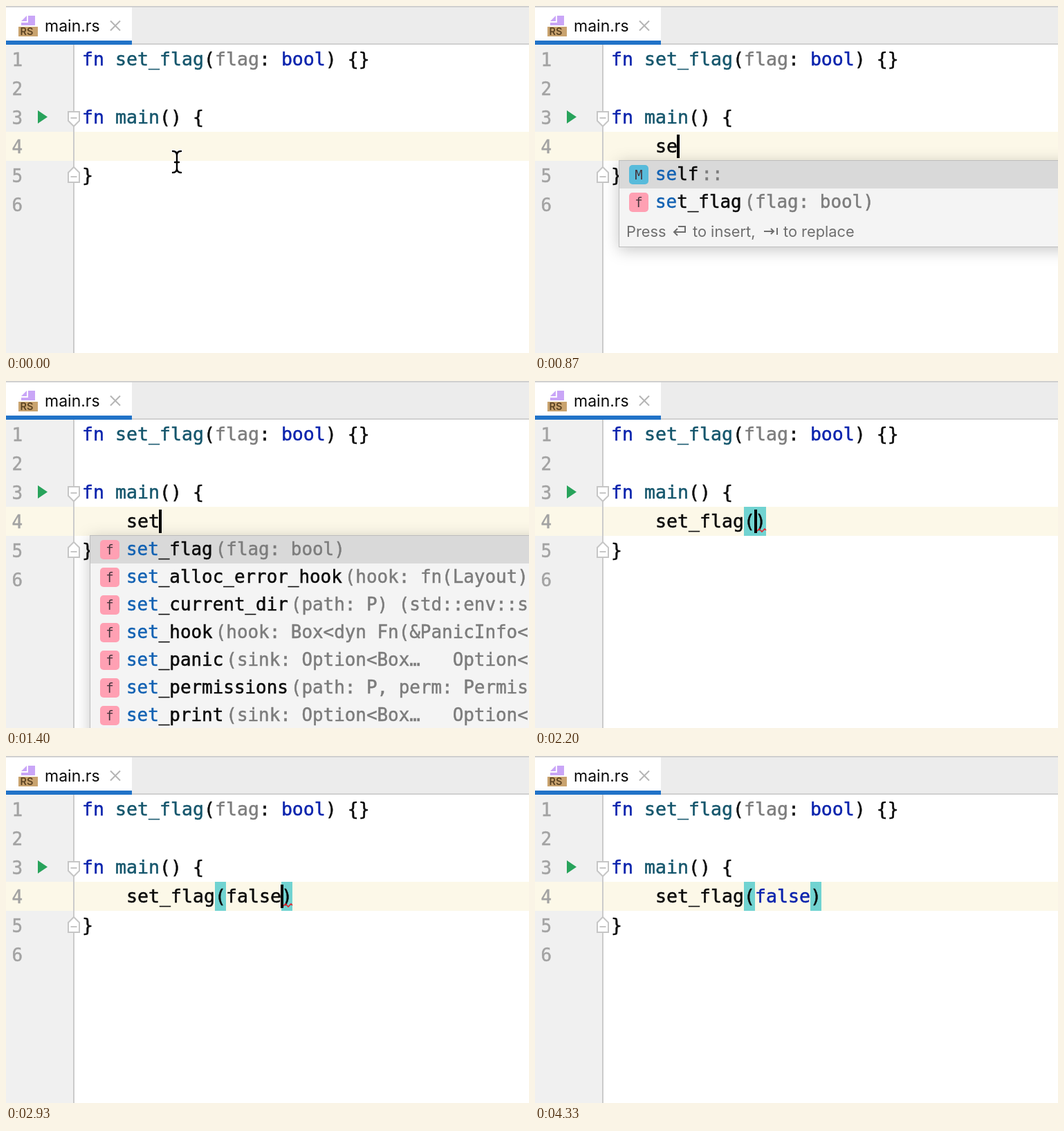
These frames come from a looping animation (756 by 502 pixels, 4390 ms). An HTML page:

```html
<!DOCTYPE html>
<html lang="en">
<head>
<meta charset="utf-8">
<title>Code completion</title>
<style>
  html, body { margin: 0; width: 100%; height: 100%; overflow: hidden; background: #fff; }
  svg { display: block; }
  text { white-space: pre; color: #0a0a0a; }
  text, tspan { fill: currentColor; }
  .code { font: 26.57px "DejaVu Sans Mono", monospace; }
  .item, .num { font: 25.9px "DejaVu Sans Mono", monospace; }
  .code, .item, .num, .code tspan, .item tspan { stroke: currentColor; stroke-width: .5px; }
  .item.bold, .item.bold tspan { font-weight: 700; stroke: none; }
  .badge { font: 19px "DejaVu Sans Mono", monospace; text-anchor: middle; color: #46343c; }
  .ui { font: 23px Inter, sans-serif; }
  .hint { font: 21.8px Inter, sans-serif; color: #6e6e6e; }
  .num { color: #a3a3a3; }
  .kw { color: #0a23ad; }
  .fn { color: #15566c; }
  .dim { color: #7c7c7c; }
  .hit { color: #1362b3; }
  .line { fill: none; stroke-width: 2; }
  .fold { fill: #fff; stroke: #c6c6c6; stroke-width: 2; }
</style>
</head>
<body>
<svg width="756" height="502" viewBox="0 0 756 502">
  <defs>
    <filter id="shadow" x="-10%" y="-60%" width="120%" height="220%">
      <feDropShadow dx="0" dy="4" stdDeviation="11" flood-opacity=".22"/>
    </filter>
    <path id="beam" d="M241 210Q247 210 247 216Q247 210 253 210M247 215V236M241 241Q247 241 247 235Q247 241 253 241M244 226H250"/>
  </defs>

  <rect width="756" height="502" fill="#fff"/>
  <rect y="56" width="97" height="446" fill="#f0f0f0"/>
  <rect y="182" width="756" height="42" fill="#fcf8e8"/>
  <rect x="97" y="56" width="2" height="446" fill="#cbcbcb"/>

  <rect width="756" height="56" fill="#ececec"/>
  <rect width="756" height="2" fill="#d0d0d0"/>
  <rect y="54" width="756" height="2" fill="#d0d0d0"/>
  <rect y="2" width="182" height="48" fill="#fff"/>
  <rect y="50" width="182" height="6" fill="#2173c8"/>
  <path d="M22 22L30 14V22ZM32 14H42V28H22V24H32Z" fill="#c9a5f7"/>
  <rect x="18" y="30" width="28" height="14" fill="#c9a36f"/>
  <text x="20.5" y="42.2" style="font:600 14.5px Inter,sans-serif;color:#5a4222">RS</text>
  <text class="ui" x="56" y="36.5">main.rs</text>
  <path class="line" d="M151 21.5L165 35.5M165 21.5L151 35.5" stroke="#b4b4b4"/>

  <g id="numbers"></g>
  <path d="M46 151L60 160.5L46 170Z" fill="#28a35b"/>
  <path class="fold" d="M90 153H106V166L98 174L90 166ZM93.5 162H102.5"/>
  <path class="fold" d="M90 255H106V241L98 233L90 241ZM93.5 247H102.5"/>

  <text class="code" x="110" y="86"><tspan class="kw">fn</tspan> <tspan class="fn">set_flag</tspan>(<tspan class="dim">flag</tspan>: <tspan class="kw">bool</tspan>) {}</text>
  <text class="code" x="110" y="170"><tspan class="kw">fn</tspan> <tspan class="fn">main</tspan>() {</text>
  <text class="code" x="110" y="254">}</text>

  <g id="live"></g>

  <g id="mouse" fill="none" stroke-linecap="round">
    <use href="#beam" stroke="#fff" stroke-width="5"/>
    <use href="#beam" stroke="#000" stroke-width="2.4"/>
  </g>
</svg>

<script>
const LOOP = 4390;
const LEFT = 174, CELL = 16;
const $ = id => document.getElementById(id);

// [icon, text]: *matched part*, grey tail after ~
const LISTS = {
  s: { x: 121, items: [
    ['M', '*s*elf~::'],
    ['f', '*s*et_flag~(flag: bool)'],
    ['M', '*s*td~::']
  ] },
  se: { x: 121, items: [['M', '*se*lf~::'], ['f', '*se*t_flag~(flag: bool)']] },
  set: { x: 121, items: [
    ['f', '*set*_flag~(flag: bool)'],
    ['f', '*set*_alloc_error_hook~(hook: fn(Layout)'],
    ['f', '*set*_current_dir~(path: P) (std::env::set'],
    ['f', '*set*_hook~(hook: Box<dyn Fn(&PanicInfo<'],
    ['f', '*set*_panic~(sink: Option<Box…   Option<Box'],
    ['f', '*set*_permissions~(path: P, perm: Permissions)'],
    ['f', '*set*_print~(sink: Option<Box…   Option<Box']
  ] },
  fa: { x: 265, items: [
    ['', '*fa*lse'],
    ['f', '*fa*bsf32~(x: f32) (std::intrinsics)'],
    ['f', '*fa*bsf64~(x: f64) (std::intrinsics)'],
    ['f', '*fa*dd_fast~(a: T, b: T) (std::intrinsics)'],
    ['!', '*f*ormat_*a*rgs~!'],
    ['!', '*f*ormat_*a*rgs_nl~!']
  ] },
  fal: { x: 265, items: [['', '*fal*se']] }
};

// Each step: start time and what changes from the step before
const STEPS = [
  { at: 0, typed: '', call: false, caret: false, mouse: true, list: '', wavy: false, keyword: false },
  { at: 130, caret: true },
  { at: 600, typed: 's', mouse: false },
  { at: 730, list: 's' },
  { at: 800, typed: 'se', list: 'se' },
  { at: 1130, typed: 'set' },
  { at: 1200, list: 'set' },
  { at: 1470, typed: '', call: true, list: '' },
  { at: 1800, wavy: true },
  { at: 2270, typed: 'f' },
  { at: 2400, typed: 'fa' },
  { at: 2470, list: 'fa' },
  { at: 2600, typed: 'fal', list: 'fal' },
  { at: 2930, typed: 'false', list: '' },
  { at: 3130, keyword: true },
  { at: 3270, wavy: false },
  { at: 4200, caret: false }
];
STEPS.forEach((step, i) => { STEPS[i] = { ...STEPS[i - 1], ...step }; });

const esc = s => s.replace(/&/g, '&amp;').replace(/</g, '&lt;');
const span = (cls, s, dx = 0) => `<tspan class="${cls}" dx="${dx}">${esc(s)}</tspan>`;
const rect = (x, y, w, h, fill, more = '') =>
  `<rect x="${x}" y="${y}" width="${w}" height="${h}" fill="${fill}" ${more}/>`;
const text = (cls, x, y, body) => `<text class="${cls}" x="${x}" y="${y}">${body}</text>`;

function icon(kind, x, mid) {
  if (!kind) return '';
  if (kind === '!') {
    return rect(x + 26, mid - 12, 5, 15, '#db3f4e') + rect(x + 26, mid + 7, 5, 5, '#db3f4e');
  }
  const fill = kind === 'M' ? '#58bbdb' : '#ffa0b3';
  return rect(x + 15, mid - 14, 28, 28, fill, 'rx="5"') + text('badge', x + 29, mid + 7, kind);
}

function hint(x, mid) {
  return text('hint', x + 11, mid + 8, 'Press') +
    text('hint', x + 107, mid + 8, 'to insert,') +
    text('hint', x + 238, mid + 8, 'to replace') +
    `<path class="line" transform="translate(${x} ${mid})" stroke="#6e6e6e" d="M86 -7H96V1H80M85 -4L80 1L85 6
      M210 0H224M220 -4L224 0L220 4M229 -5V5"/>`;
}

function popup({ x, items }) {
  const top = 223, height = items.length * 40 + 45;
  let out = rect(x + .5, top + .5, 800, height, '#f4f4f4', 'stroke="#bdbdbd" filter="url(#shadow)"') +
    rect(x + 1, top + 1, 800, 40, '#d9d9d9');
  items.forEach(([kind, label], i) => {
    const mid = top + 21 + i * 40;
    const [name, tail = ''] = label.split('~');
    const body = name.split('*').map((s, k) => k % 2 ? span('hit', s) : esc(s)).join('');
    out += icon(kind, x, mid) +
      text(kind ? 'item' : 'item bold', x + 53, mid + 8, body + span('dim', tail, 4));
  });
  return out + hint(x, top + items.length * 40 + 23);
}

function draw(s) {
  const head = s.call ? 'set_flag(' : '';
  const open = LEFT + 8 * CELL;
  const end = LEFT + (head.length + s.typed.length) * CELL;
  let out = '';
  if (s.call) {
    out += rect(open, 182, CELL, 42, '#71d3d1') + rect(end, 182, CELL, 42, '#71d3d1');
  }
  out += text('code', LEFT, 212,
    head + (s.keyword ? span('kw', s.typed) : s.typed) + (s.call ? ')' : ''));
  if (s.wavy) {
    out += `<path d="M${end + 2} 218l4 -4l4 4l4 -4l2 2" fill="none" stroke="#e3262f" stroke-width="1.6"/>`;
  }
  if (s.caret) out += rect(end - 1, 186, 4, 34, '#000');
  if (s.list) out += popup(LISTS[s.list]);
  $('live').innerHTML = out;
  $('mouse').style.display = s.mouse ? '' : 'none';
}

$('numbers').innerHTML = [1, 2, 3, 4, 5, 6]
  .map(n => text('num', 8.5, 44.5 + n * 42, n)).join('');

const start = performance.now();
let shown;
function tick() {
  const t = (performance.now() - start) % LOOP;
  const step = STEPS.filter(s => s.at <= t).pop() || STEPS[0];
  if (step !== shown) draw(shown = step);
  requestAnimationFrame(tick);
}
tick();
</script>
</body>
</html>
```
